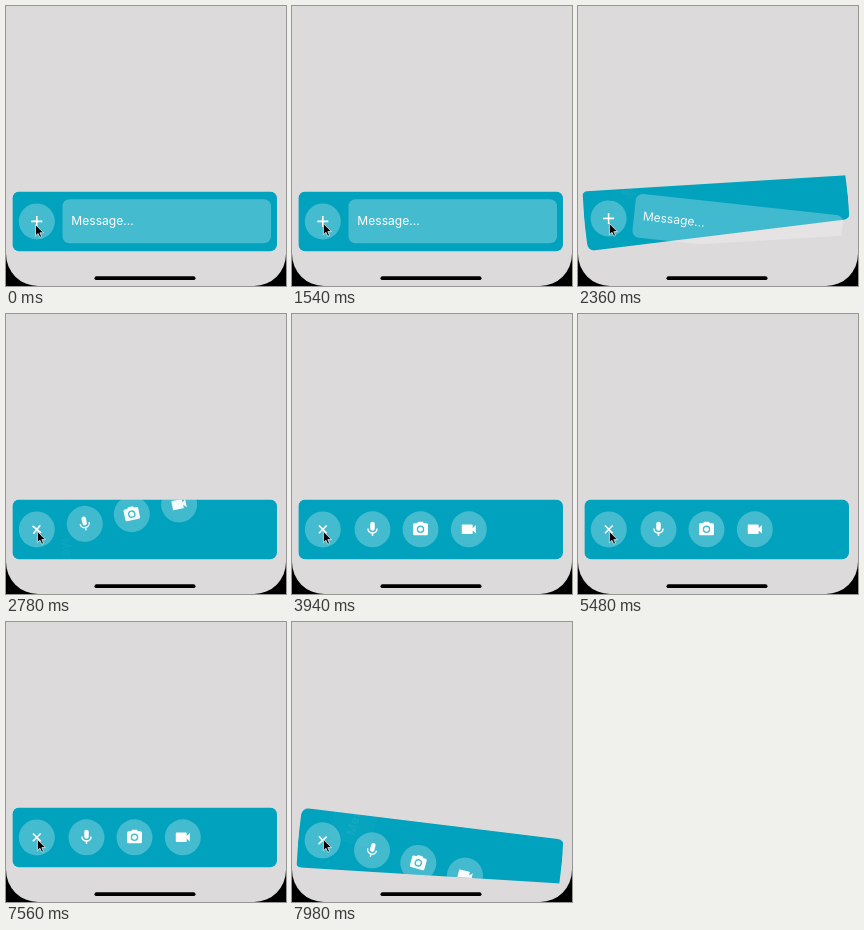
An HTML page that plays this animation: 280 by 280 pixels, repeating every 8000 ms.

```html
<!DOCTYPE html>
<html lang="en">
<head>
<meta charset="utf-8">
<title>Message bar</title>
<style>
  html, body { margin: 0; width: 100%; height: 100%; overflow: hidden; background: #000; }
  svg { display: block; width: 100%; height: 100%; }
  text { font: 400 12.1px Inter, "Liberation Sans", sans-serif; }
  .pad { fill: #fff; fill-opacity: .27; }
</style>
</head>
<body>
<svg viewBox="0 0 280 280">
  <defs>
    <clipPath id="frame"><rect x="6.4" y="185.4" width="264.6" height="60"/></clipPath>
  </defs>
  <rect width="280" height="280" fill="#000"/>
  <rect y="-60" width="280" height="340" rx="32" fill="#dcdadb"/>
  <rect x="88.5" y="270.3" width="101" height="3.8" rx="1.9" fill="#000"/>

  <g id="outer" clip-path="url(#frame)">
    <g id="inner">
      <rect x="6.4" y="185.4" width="264.6" height="60" rx="7" fill="#00a2bd"/>
      <g id="field">
        <rect class="pad" x="56.5" y="193.2" width="208.5" height="44" rx="7"/>
        <text x="65.3" y="219.4" fill="#fff">Message...</text>
      </g>
      <g id="tools" fill="#fff">
        <g transform="translate(80.5 215.3)">
          <circle class="pad" r="18"/>
          <g transform="scale(.75) translate(-12 -12)">
            <rect x="9" y="2" width="6" height="12" rx="3"/>
            <path d="M5.9 11a6.1 6 0 0 0 12.2 0M12 17v4" fill="none" stroke="#fff" stroke-width="1.9"/>
          </g>
        </g>
        <g transform="translate(128.5 215.3)">
          <circle class="pad" r="18"/>
          <g transform="scale(.75) translate(-12 -12)">
            <circle cx="12" cy="12" r="3.2"/>
            <path fill-rule="evenodd" d="M9 2 7.2 4H4a2 2 0 0 0-2 2v12a2 2 0 0 0 2 2h16a2 2 0 0 0 2-2V6a2 2 0 0 0-2-2h-3.2L15 2zM12 7a5 5 0 0 1 0 10a5 5 0 0 1 0-10z"/>
          </g>
        </g>
        <g transform="translate(176.8 215.3)">
          <circle class="pad" r="18"/>
          <path transform="scale(.78) translate(-12 -12)" d="M17 10.5V7a1 1 0 0 0-1-1H4a1 1 0 0 0-1 1v10a1 1 0 0 0 1 1h12a1 1 0 0 0 1-1v-3.5l4 4v-11z"/>
        </g>
      </g>
      <circle class="pad" cx="30.8" cy="215.4" r="18"/>
      <path id="plus" d="M25.3 215.4h11M30.8 209.9v11" stroke="#fff" stroke-width="1.6"/>
    </g>
  </g>

  <path id="cursor" d="M0 0V11.2L2.6 8.8 4.3 12.7 6.1 11.9 4.4 8.1H8z" fill="#000" stroke="#fff" stroke-width=".7"/>
</svg>
<script>
const LOOP = 8000, SPAN = 815, OPEN = 2157, CLOSE = 7822;
const TILT = 3.5;
const $ = id => document.getElementById(id);
const [outer, inner, field, tools, plus, cursor] =
  ["outer", "inner", "field", "tools", "plus", "cursor"].map($);

const clamp = x => Math.min(1, Math.max(0, x));
const ease = x => (1 - Math.cos(Math.PI * clamp(x))) / 2;
const part = (t, start, length) => clamp((t - start) / length);
const turn = (el, deg, x, y) => el.setAttribute("transform", `rotate(${deg} ${x} ${y})`);

// Rocks one way, then the other, and settles at three quarters of the span.
const rock = u => ease(u * 5) - 2 * ease(u * 4 - 1) + ease(u * 4 - 2);

function fade(el, alpha) {
  el.setAttribute("opacity", alpha);
  el.setAttribute("visibility", alpha > 0 ? "visible" : "hidden");
}

function draw(t) {
  const opening = part(t, OPEN, SPAN), closing = part(t, CLOSE, SPAN);
  const a = ease(opening), b = ease(closing);
  const tilt = TILT * (rock(closing) - rock(opening));
  turn(outer, tilt, 6.4, 215.4);
  turn(inner, tilt, 6.4, 215.4);

  // Each part swings in from above and leaves downwards.
  const back = t >= CLOSE;
  turn(field, 90 * (back ? b - 1 : a), 56.5, 215.2);
  turn(tools, 90 * (back ? b : a - 1), 53, 221);
  fade(field, back ? b : 1 - ease(a));
  fade(tools, ease(a) - ease(b));
  turn(plus, 45 * (a - b), 30.8, 215.4);

  const m = ease(part(t, 300, 380));
  cursor.setAttribute("transform", `translate(${29.5 + 1.9 * m} ${218.7 - 1.2 * m})`);
}

const begin = performance.now();
function tick() {
  draw((performance.now() - begin) % LOOP);
  requestAnimationFrame(tick);
}
tick();
</script>
</body>
</html>
```
